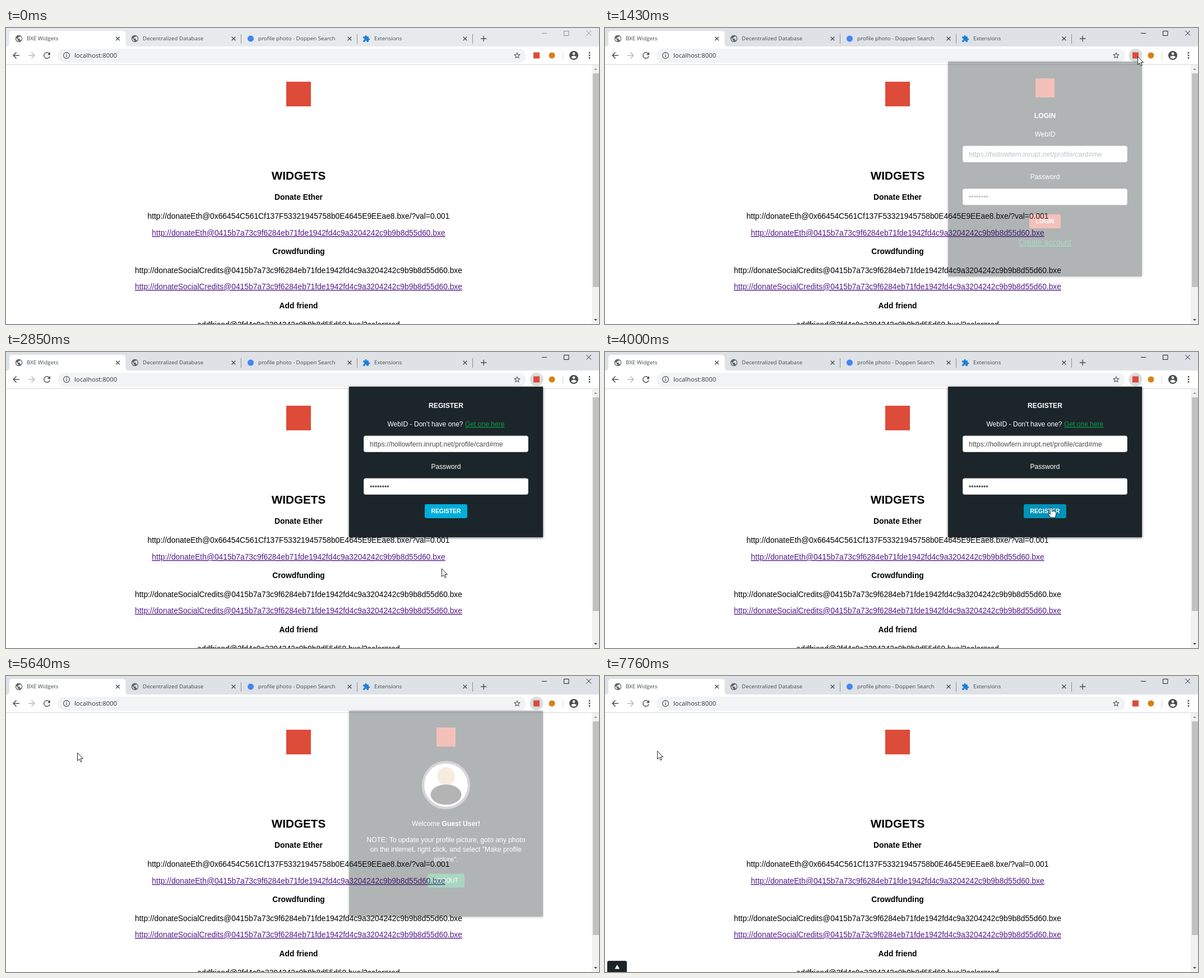
An HTML page for the animation above (7990 ms loop, 1058 by 529 pixels).

```html
<!DOCTYPE html>
<html lang="en">
<head>
<meta charset="utf-8">
<title>Widgets</title>
<style>
html, body { margin: 0; width: 100%; height: 100%; overflow: hidden; background: #fff; }
svg { display: block; }
text { white-space: pre; }
.tab { font: 9.8px "Open Sans", sans-serif; fill: #45494d; }
.page, .popup { font: 13.82px "Liberation Sans", Arial, sans-serif; text-anchor: middle; }
.page a, .link { text-decoration: underline; text-decoration-thickness: .86px; }
.page a { fill: #551a8b; }
.bold { font-weight: bold; }
.popup { font-size: 12.1px; fill: #fff; }
.popup .input { font-size: 12.4px; fill: #495057; text-anchor: start; }
.popup .button { font-size: 10.4px; }
.popup .link { fill: #0c9a4c; }
.line { fill: none; stroke: #4a4d51; stroke-width: 1.4; }
.brand { fill: #dd4b39; }
</style>
</head>
<body>
<svg width="1058" height="529" viewBox="0 0 1058 529">
  <defs>
    <path id="globe" fill="#5f6368" transform="scale(.62) translate(-12 -12)" d="M12 2C6.48 2 2 6.48 2 12s4.48 10 10 10 10-4.48 10-10S17.52 2 12 2zm-1 17.93c-3.95-.49-7-3.85-7-7.93 0-.62.08-1.21.21-1.79L9 15v1c0 1.1.9 2 2 2v1.93zm6.9-2.54c-.26-.81-1-1.39-1.9-1.39h-1v-3c0-.55-.45-1-1-1H8v-2h2c.55 0 1-.45 1-1V7h2c1.1 0 2-.9 2-2v-.41c2.93 1.19 5 4.06 5 7.41 0 2.08-.8 3.97-2.1 5.39z"/>
    <path id="cross" d="M-3.3-3.3 3.3 3.3M3.3-3.3-3.3 3.3"/>
    <path id="back" transform="scale(.74) translate(-12 -12)" d="M20 11H7.83l5.59-5.59L12 4l-8 8 8 8 1.41-1.41L7.83 13H20z"/>
    <rect id="field" x="638.5" width="293" height="28.5" rx="3" fill="#fff" stroke="#ced4da"/>
    <rect id="badge" class="brand" x="768" y="92" width="34" height="34"/>
  </defs>

  <!-- page -->
  <g class="page">
    <rect class="brand" x="500" y="96" width="44" height="44"/>
    <text class="bold" x="522" y="271" style="font-size:20.7px">WIDGETS</text>
    <text class="bold" x="522" y="307">Donate Ether</text>
    <text x="522" y="341">http://donateEth@0x66454C561Cf137F53321945758b0E4645E9EEae8.bxe/?val=0.001</text>
    <text x="522" y="371"><a>http://donateEth@0415b7a73c9f6284eb71fde1942fd4c9a3204242c9b9b8d55d60.bxe</a></text>
    <text class="bold" x="522" y="404">Crowdfunding</text>
    <text x="522" y="438">http://donateSocialCredits@0415b7a73c9f6284eb71fde1942fd4c9a3204242c9b9b8d55d60.bxe</text>
    <text x="522" y="467"><a>http://donateSocialCredits@0415b7a73c9f6284eb71fde1942fd4c9a3204242c9b9b8d55d60.bxe</a></text>
    <text class="bold" x="522" y="501">Add friend</text>
    <text x="522" y="535">addfriend@2fd4c9a3204242c9b9b8d55d60.bxe/?color=red</text>
  </g>
  <g id="drawer">
    <path d="M4 535V512q0-3 3-3h29q3 0 3 3v23z" fill="#1c262a"/>
    <path d="M17.5 523.5h8.5l-4.2-7.5z" fill="#fff"/>
  </g>
  <g id="status">
    <path d="M-1 530V511.5H348q3.5 0 3.5 3.5v15z" fill="#fff" stroke="#cfd1d4"/>
    <text class="tab" x="3" y="525" style="fill:#7b8085">Connecting...</text>
  </g>
  <rect x="1045" y="66" width="13" height="463" fill="#f1f1f1"/>
  <rect id="thumb" x="1047" y="81" width="11" fill="#c1c1c1"/>
  <path d="M1049 75h6l-3-3.5z" fill="#a3a3a3"/>
  <path d="M1049 520h6l-3 3.5z" fill="#505050"/>

  <!-- browser frame -->
  <rect id="strip" width="1058" height="34"/>
  <path d="M0 33.5q6 0 6-6V11q0-6 6-6H207.500q6 0 6 6V27.500q0 6 6 6z" fill="#fff"/>
  <rect y="33" width="1058" height="32.5" fill="#fff"/>
  <path d="M0 65.5H1058" stroke="#d5d8db"/>
  <path d="M419.5 11v17M626.5 11v17M832.5 11v17" stroke="#8b8f94"/>
  <use id="favicon" href="#globe" x="23" y="19"/>
  <path id="spinner" class="line" d="M0-5.8A5.8 5.8 0 1 1-3.5 4.6" style="stroke:#4a86d0;stroke-width:1.7"/>
  <use href="#globe" x="230" y="19"/>
  <circle cx="436.5" cy="19" r="5.5" fill="#4285f4"/>
  <path fill="#1a80d9" transform="translate(636 12.3) scale(.58)" d="M20.5 11H19V7c0-1.1-.9-2-2-2h-4V3.5a2.5 2.5 0 0 0-5 0V5H4c-1.1 0-2 .9-2 2v3.8h1.5a2.7 2.7 0 0 1 0 5.4H2V20c0 1.1.9 2 2 2h3.8v-1.5a2.7 2.7 0 0 1 5.4 0V22H17c1.1 0 2-.9 2-2v-4h1.5a2.5 2.5 0 0 0 0-5z"/>
  <g class="tab">
    <text x="37" y="22.4">BXE Widgets</text>
    <text x="244" y="22.4">Decentralized Database</text>
    <text x="450" y="22.4">profile photo - Doppen Search</text>
    <text x="657" y="22.4">Extensions</text>
  </g>
  <g class="line">
    <use href="#cross" x="199.5" y="19"/><use href="#cross" x="406" y="19"/>
    <use href="#cross" x="613" y="19"/><use href="#cross" x="819" y="19"/>
    <path d="M847 19h10.5M852.2 13.7v10.5"/>
  </g>
  <path id="controls" fill="none" d="M956 9.5h9M995.500 5.500h8.500v8h-8.500zM1035.500 5l8.500 8.500M1044 5l-8.500 8.500"/>

  <use href="#back" x="18" y="49" fill="#4a4d51"/>
  <use href="#back" transform="translate(46 49) scale(-1 1)" fill="#b9bbbe"/>
  <path id="reload" fill="#4a4d51" transform="translate(73 49) scale(.74) translate(-12 -12)" d="M17.65 6.35A7.96 7.96 0 0 0 12 4a8 8 0 1 0 7.73 10h-2.08A6 6 0 1 1 12 6c1.66 0 3.14.69 4.22 1.78L13 11h7V4z"/>
  <use id="stop" class="line" href="#cross" transform="translate(73 49) scale(1.3)" style="stroke-width:1.05"/>
  <rect x="92" y="37" width="836" height="25" rx="12.5" fill="#f1f3f4"/>
  <g class="line" style="stroke-width:1.2">
    <circle cx="108" cy="49" r="5.4"/>
    <path d="M108 48v4M108 45.5v1.4"/>
  </g>
  <text class="tab" x="122" y="53" style="font-size:11.3px;fill:#33363a">localhost:8000</text>
  <path fill="#4a4d51" transform="translate(904.8 41.8) scale(.6)" d="M22 9.24l-7.19-.62L12 2 9.19 8.63 2 9.24l5.46 4.73L5.82 21 12 17.27 18.18 21l-1.63-7.03zM12 15.4l-3.76 2.27 1-4.28-3.32-2.88 4.38-.38L12 6.1l1.71 4.04 4.38.38-3.32 2.88 1 4.28z"/>
  <circle id="hover" cx="946.5" cy="49" r="12" fill="#dadcdf"/>
  <rect class="brand" x="941" y="43.5" width="11" height="11"/>
  <circle cx="974" cy="49" r="5.5" fill="#d6820f"/>
  <path d="M993.5 43v13" stroke="#d0d3d7"/>
  <path fill="#4a4d51" transform="translate(1013 49) scale(.8) translate(-12 -12)" d="M12 2a10 10 0 1 0 0 20 10 10 0 0 0 0-20zm0 3a3 3 0 1 1 0 6 3 3 0 0 1 0-6zm0 14.2a7.2 7.2 0 0 1-6-3.22c.03-1.99 4-3.08 6-3.08s5.97 1.09 6 3.08a7.2 7.2 0 0 1-6 3.22z"/>
  <g fill="#4a4d51"><circle cx="1041" cy="44.5" r="1.4"/><circle cx="1041" cy="49" r="1.4"/><circle cx="1041" cy="53.5" r="1.4"/></g>

  <!-- extension popup -->
  <g id="popup" class="popup">
    <rect id="panel" x="612" y="62" width="346" fill="#1c262a" style="filter:drop-shadow(0 1px 2px #0009)"/>
    <g id="login">
      <use href="#badge"/>
      <text class="bold" x="785" y="163">LOGIN</text>
      <text x="785" y="196">WebID</text>
      <use href="#field" y="213"/>
      <text class="input" x="649" y="232">https://hollowfern.inrupt.net/profile/card#me</text>
      <text x="785" y="272">Password</text>
      <use href="#field" y="289.5"/>
      <text class="input" x="649" y="308">••••••••</text>
      <rect class="brand" x="757" y="335" width="56" height="25" rx="3"/>
      <text class="button bold" x="785" y="351">LOGIN</text>
      <text class="link" x="785" y="390" style="font-size:13.82px">Create account</text>
    </g>
    <g id="register">
      <text class="bold" x="785" y="100">REGISTER</text>
      <text x="785" y="133">WebID - Don't have one? <tspan class="link">Get one here</tspan></text>
      <use href="#field" y="150"/>
      <text class="input" x="649" y="169">https://hollowfern.inrupt.net/profile/card#me</text>
      <text x="785" y="209">Password</text>
      <use href="#field" y="226"/>
      <text class="input" x="649" y="245">••••••••</text>
      <rect id="submit" x="747" y="272" width="76" height="25" rx="3"/>
      <text class="button bold" x="785" y="288">REGISTER</text>
    </g>
    <g id="profile">
      <use href="#badge"/>
      <circle cx="785" cy="195" r="41" fill="#fff" stroke="#868686" stroke-width="4.5"/>
      <circle cx="785" cy="179" r="16" fill="#e8c9a6"/>
      <ellipse cx="785" cy="212" rx="27.5" ry="18" fill="#252525"/>
      <text x="785" y="268">Welcome <tspan class="bold">Guest User!</tspan></text>
      <text x="785" y="297">NOTE: To update your profile picture, goto any photo</text>
      <text x="785" y="314">on the internet, right click, and select "Make profile</text>
      <text x="785" y="332">picture".</text>
      <rect x="752" y="353.5" width="66" height="24.5" rx="3" fill="#078c49"/>
      <text class="button" x="785" y="369">LOGOUT</text>
    </g>
  </g>

  <g id="cursor" fill="#fff" stroke="#111" stroke-width=".9" stroke-linejoin="round">
    <path id="arrow" d="M.5 0V14.5L3.8 11.4 6 16.5 8.2 15.5 6 10.6H10.5z"/>
    <path id="hand" d="M-1.6 1.2Q0-.8 1.6 1.2V7l1.6-.6 1.4.8 1.5-.4 1.3.9 1.4-.1V13L7 18H-1L-5 11.6Q-4.8 9.6-3 10.6L-1.6 12z"/>
  </g>
</svg>
<script>
const LOOP = 7990;
const $ = id => document.getElementById(id);
const set = (id, name, value) => $(id).setAttribute(name, value);
const show = (id, on) => { $(id).style.display = on ? "" : "none"; };

// Progress from 0 to 1 in n jumps, the first at t0 and the last at t1.
const stepped = (t, t0, t1, n) => t < t0 ? 0
  : Math.min(1, (Math.floor((t - t0) / (t1 - t0) * (n - 1) + 1e-6) + 1) / n);

// Pointer moves: start, end, jumps, bend point, target.
const moves = [
  [440, 900, 7, [960, 300], [950, 51]],
  [1750, 2360, 9, [900, 280], [777, 387]],
  [3300, 3750, 7, [780, 320], [796, 278]],
  [5170, 5555, 6, [420, 150], [127, 137]],
  [5880, 6190, 5, [95, 80], [72, 47]],
  [6350, 6660, 5, [85, 90], [93, 134]]
];

function pointer(t) {
  let at = [905, 525];
  for (const [t0, t1, n, bend, to] of moves) {
    const p = stepped(t, t0, t1, n), q = 1 - p;
    at = at.map((a, i) => q * q * a + 2 * p * q * bend[i] + p * p * to[i]);
  }
  return at;
}

function draw(t) {
  const within = (a, b) => t >= a && t < b;
  const active = t >= 1130;
  set("strip", "fill", active ? "#dee1e6" : "#e7eaed");
  set("controls", "stroke", active ? "#222" : "#8f9294");
  show("hover", within(1200, 5710));

  show("popup", within(1430, 5710));
  set("popup", "opacity", t < 1510 || t >= 5633 ? .34 : t < 1590 ? .8 : 1);
  set("popup", "transform", `translate(0 ${t < 1510 ? -2 : t < 1590 ? -1 : 0})`);
  set("panel", "height", t < 2765 ? 384 : t < 4690 ? 269 : 368);
  show("login", t < 2590);
  show("register", within(2590, 4690));
  show("profile", t >= 4690);
  set("submit", "fill", within(4000, 4070) ? "#0093b8" : "#00aeda");

  const loading = within(6270, 7290);
  show("favicon", !loading);
  show("spinner", loading);
  show("reload", !loading);
  show("stop", loading);
  set("spinner", "transform", `translate(23 19) rotate(${Math.floor((t - 7040) / 70) * 25})`);
  show("status", within(6800, 7290));
  set("thumb", "height", within(7360, 7600) ? 343 : 382);
  set("drawer", "transform", `translate(0 ${22 * (1 - stepped(t, 7510, 7760, 4))})`);

  const hand = within(2284, 2850) || within(3675, 4690);
  show("cursor", t >= 440);
  show("hand", hand);
  show("arrow", !hand);
  set("cursor", "transform", `translate(${pointer(t)})`);
}

let start;
function tick(now) {
  start ??= now;
  draw((now - start) % LOOP);
  requestAnimationFrame(tick);
}
draw(0);
requestAnimationFrame(tick);
</script>
</body>
</html>
```
